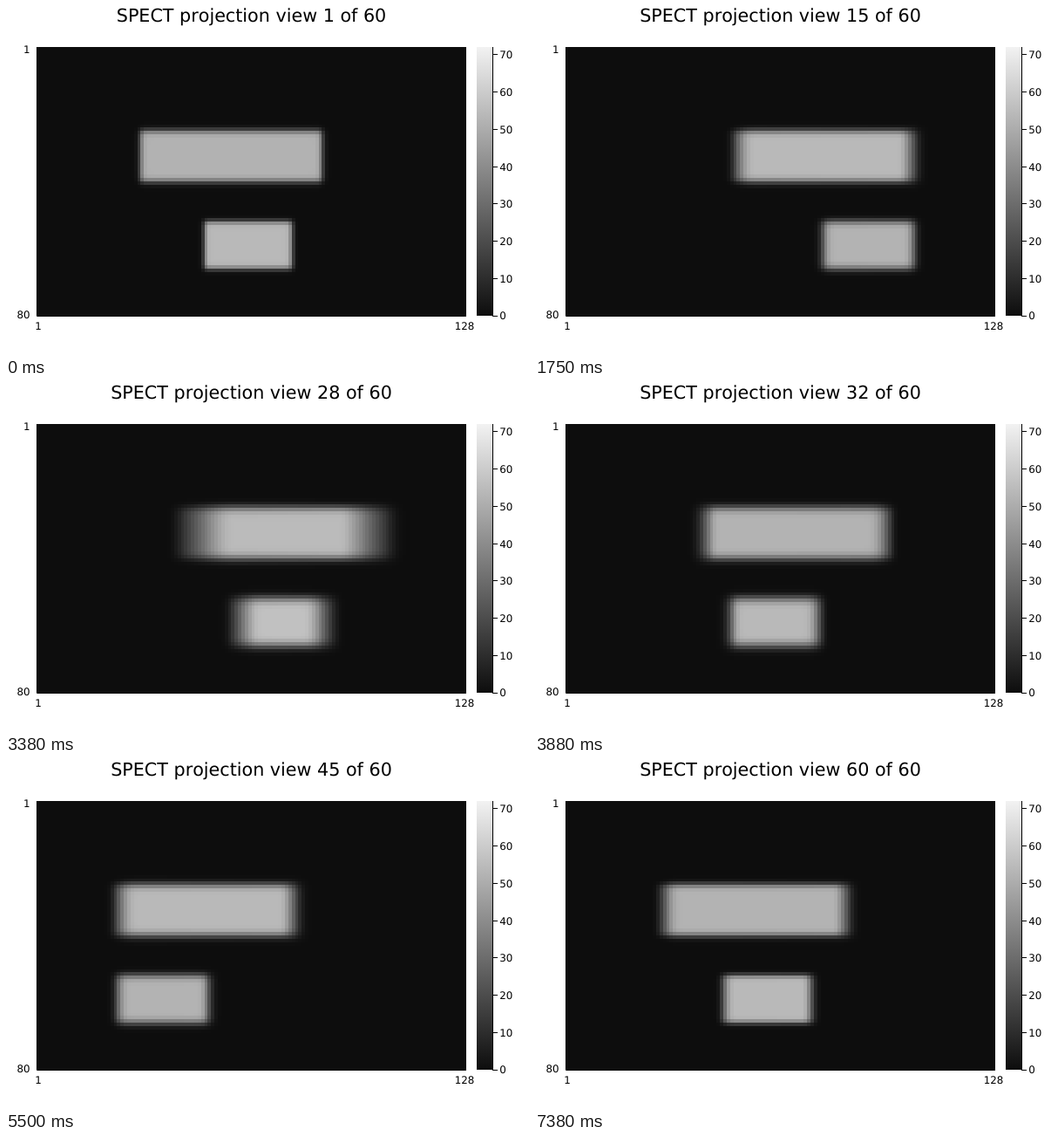
Write an HTML page with a canvas that moves like this. It is 600x400 px and loops after 7510 ms.

```html
<!DOCTYPE html>
<html lang="en">
<head>
<meta charset="utf-8">
<title>SPECT projection views</title>
<style>
  html, body { margin: 0; width: 100%; height: 100%; overflow: hidden; background: #fff; }
  #stage { position: absolute; left: 0; top: 0; width: 600px; height: 400px; }
  #map { position: absolute; left: 35px; top: 47px; width: 493px; height: 308px; image-rendering: pixelated; }
  svg { position: absolute; left: 0; top: 0; }
  text { font: 11.85px "DejaVu Sans", sans-serif; font-kerning: none; text-rendering: geometricPrecision; }
  #title { font-size: 20.7px; }
</style>
</head>
<body>
<div id="stage">
  <canvas id="map" width="128" height="80"></canvas>
  <svg id="axes" width="600" height="400" viewBox="0 0 600 400">
    <defs>
      <linearGradient id="grays" x1="0" y1="1" x2="0" y2="0">
        <stop offset="0" stop-color="#0d0d0d"/>
        <stop offset="1" stop-color="#f2f2f2"/>
      </linearGradient>
    </defs>
    <text id="title" x="281.5" y="18" text-anchor="middle"></text>
    <text x="27.5" y="53.5" text-anchor="end">1</text>
    <text x="27.5" y="358" text-anchor="end">80</text>
    <text x="37" y="371" text-anchor="middle">1</text>
    <text x="526" y="371" text-anchor="middle">128</text>
    <path d="M35.5 47V355.5H528" fill="none" stroke="#000"/>
    <rect x="540" y="47" width="18" height="308" fill="url(#grays)"/>
    <path d="M558.5 47V355.5" stroke="#000"/>
  </svg>
</div>
<script>
const NX = 128, NZ = 80, VIEWS = 60, LOOP = 7510, MAX = 72.1, REACH = 5;

// Index ranges (1-based, inclusive) and activity of each block
const blocks = [
  { x: [32, 85], y: [25, 76], z: [26, 40], level: 1 },
  { x: [51, 76], y: [25, 51], z: [53, 66], level: 2 }
];

const title = document.getElementById('title');
const ctx = document.getElementById('map').getContext('2d');
const image = ctx.createImageData(NX, NZ);

// Linearly interpolated indicator of a range
const inside = (v, [lo, hi]) => Math.max(0, Math.min(1, v - lo + 1, hi + 1 - v));

// Blur widens with distance from the detector
function kernel(depth) {
  const sigma = (1 + 3 * depth / (NX - 1)) / 2.3548;
  const k = [];
  for (let i = -REACH; i <= REACH; i++) k.push(Math.exp(-i * i / (2 * sigma * sigma)));
  const sum = k.reduce((a, b) => a + b);
  return k.map(v => v / sum);
}

function blur(line, k) {
  return line.map((_, i) => k.reduce((s, w, j) => s + w * (line[i + j - REACH] || 0), 0));
}

const kernels = Array.from({ length: NX }, (_, d) => kernel(d));
for (const b of blocks) {
  const slab = Float32Array.from({ length: NZ }, (_, i) => b.level * inside(i + 1, b.z));
  b.profiles = kernels.map(k => blur(slab, k));
}

function project(view) {
  const a = view * 2 * Math.PI / VIEWS, c = Math.cos(a), s = Math.sin(a);
  const mid = (NX + 1) / 2, out = new Float32Array(NX * NZ), row = new Float32Array(NX);
  for (const b of blocks) {
    for (let d = 0; d < NX; d++) {
      const v = d + 1 - mid;
      let any = false;
      for (let i = 0; i < NX; i++) {
        const u = i + 1 - mid;
        row[i] = inside(mid + u * c + v * s, b.x) * inside(mid - u * s + v * c, b.y);
        any = any || row[i] > 0;
      }
      if (!any) continue;
      const line = blur(row, kernels[d]);
      b.profiles[d].forEach((w, z) => {
        if (w > 0) for (let i = 0; i < NX; i++) out[z * NX + i] += w * line[i];
      });
    }
  }
  return out;
}

function show(view) {
  project(view).forEach((v, i) => {
    const g = Math.round(13 + 229 * Math.min(1, v / MAX));
    image.data.set([g, g, g, 255], i * 4);
  });
  ctx.putImageData(image, 0, 0);
  title.textContent = `SPECT projection view ${view + 1} of ${VIEWS}`;
}

let bar = '';
for (let v = 0; v <= 70; v += 10) {
  const y = 355 - v * 308 / MAX;
  const line = Math.round(y - 0.5) + 0.5;
  bar += `<path d="M558 ${line}H564" stroke="#000"/><text x="566.3" y="${y + 4.4}">${v}</text>`;
}
document.getElementById('axes').insertAdjacentHTML('beforeend', bar);

// Each view starts at a multiple of 125 ms, rounded to 10 ms
const startOf = view => Math.round(view * 12.5) * 10;
function viewAt(t) {
  let view = Math.min(VIEWS - 1, Math.floor(t / 125));
  if (t < startOf(view)) view--;
  return view;
}

let current = -1;
const t0 = performance.now();
function tick() {
  const view = viewAt((performance.now() - t0) % LOOP);
  if (view !== current) show(current = view);
  requestAnimationFrame(tick);
}
tick();
</script>
</body>
</html>
```
